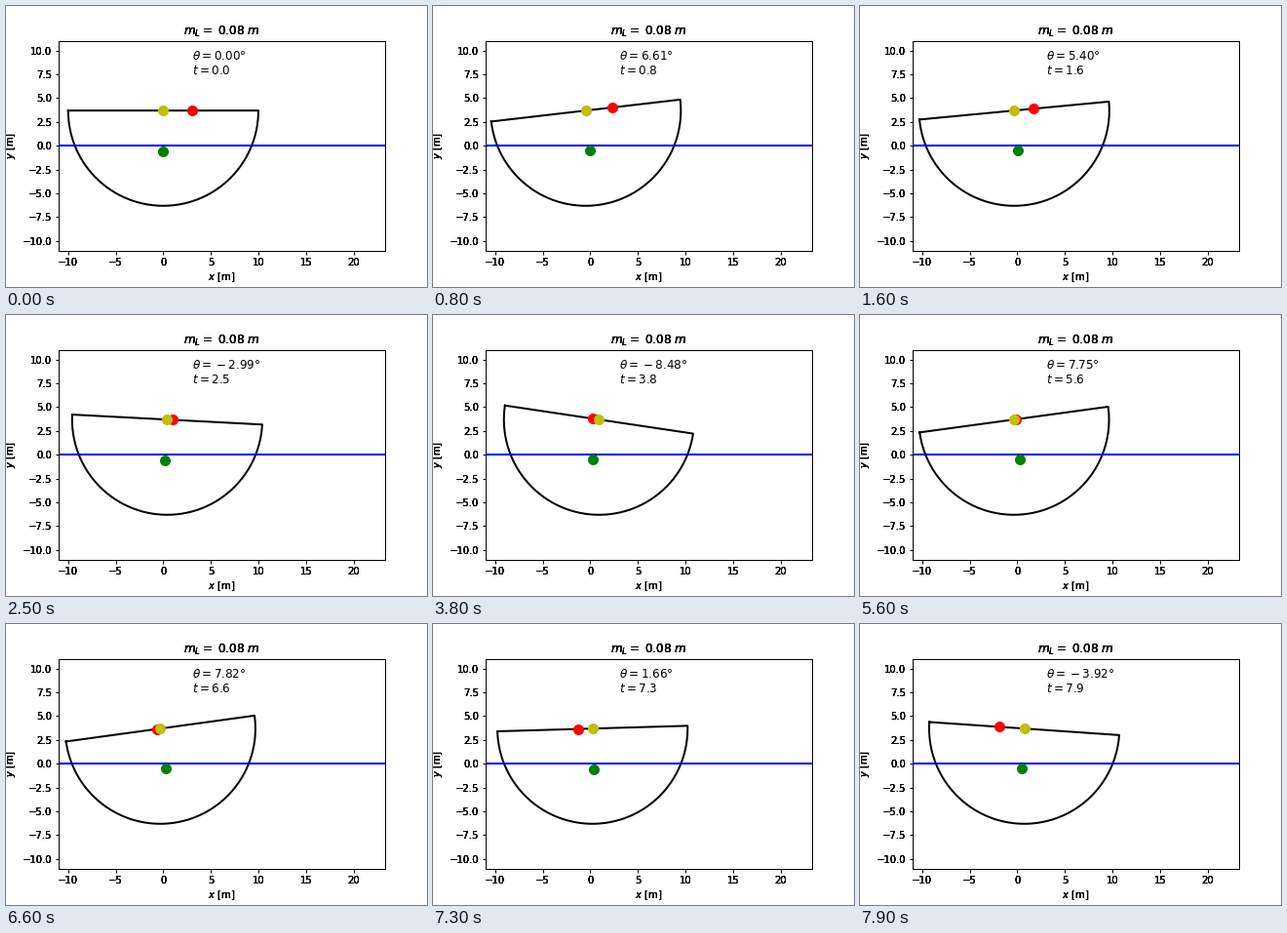
Animation of 432x288 px, one loop 8000 ms. Source, as a matplotlib script:

```python
import numpy as np
import matplotlib.pyplot as plt
from matplotlib.animation import FuncAnimation

plt.rcParams.update({"font.size": 10, "font.family": "DejaVu Sans"})

# Half-cylinder ship with a load sliding without friction on its deck
R, G = 10.0, 9.81
LOAD = 0.08                                     # load mass / ship mass
H = 4 * R / (3 * np.pi)                         # deck centre to mass centre
INERTIA = 0.5 * R**2 * (1 - 32 / (9 * np.pi**2))
Y_DECK = 3.70
FRAMES, STEP, SUB = 80, 0.1, 20


def rate(u):
    th, w, s, v = u
    torque = -(1 + LOAD) * G * H * np.sin(th) - LOAD * G * s * np.cos(th)
    return np.array([w, torque / INERTIA, v, -G * np.sin(th)])


def simulate():
    u, dt = np.array([0.0, 0.2, 3.0, 0.0]), STEP / SUB
    rows = []
    for _ in range(FRAMES):
        rows.append(u)
        for _ in range(SUB):
            k1 = rate(u)
            k2 = rate(u + dt / 2 * k1)
            k3 = rate(u + dt / 2 * k2)
            k4 = rate(u + dt * k3)
            u = u + dt / 6 * (k1 + 2 * k2 + 2 * k3 + k4)
    return np.array(rows)


def harden(text, times=5):
    """Paint a text several times so its soft edges turn solid."""
    draw = text.draw

    def repeat(renderer):
        for _ in range(times):
            draw(renderer)

    text.draw = repeat


states = simulate()

fig, ax = plt.subplots(figsize=(6, 4), dpi=72)
fig.subplots_adjust(left=0.125, right=0.9, bottom=0.125, top=0.88)
ax.set_aspect("equal")
ax.set_xlim(-11, 23.3)
ax.set_ylim(-11, 11)
ax.set_xticks(np.arange(-10, 21, 5))
ax.set_yticks(np.arange(-10, 10.1, 2.5))
ax.tick_params(width=1)
for spine in ax.spines.values():
    spine.set_linewidth(1)
ax.set_xlabel("$x$ [m]")
ax.set_ylabel("$y$ [m]")
ax.set_title("$m_L=$ 0.08 $m$", fontsize=12)
for label in [ax.title, ax.xaxis.label, ax.yaxis.label,
              *ax.get_xticklabels(), *ax.get_yticklabels()]:
    harden(label)

hull, = ax.plot([], [], "k", lw=2)
ax.axhline(0, color="b", lw=2)
mass_dot, load_dot, deck_dot = (
    ax.plot([], [], "o", color=c, ms=10)[0] for c in "gry")
angle_text = ax.text(3, 9, "", fontsize=12)
time_text = ax.text(3, 7.5, "", fontsize=12)


def update(i):
    th, _, s, _ = states[i]
    x_mass = LOAD * (states[0, 2] - s)          # momentum is conserved
    x = x_mass - H * np.sin(th)
    arc = th + np.linspace(np.pi, 2 * np.pi, 181)
    px, py = x + R * np.cos(arc), Y_DECK + R * np.sin(arc)
    hull.set_data(np.append(px, px[0]), np.append(py, py[0]))
    mass_dot.set_data([x_mass], [Y_DECK - H * np.cos(th)])
    load_dot.set_data([x + s * np.cos(th)], [Y_DECK + s * np.sin(th)])
    deck_dot.set_data([x], [Y_DECK])
    angle_text.set_text(rf"$\theta = {np.degrees(th):.2f}$°")
    time_text.set_text(f"$t = {i * STEP:.1f}$")
    return hull, mass_dot, load_dot, deck_dot, angle_text, time_text


anim = FuncAnimation(fig, update, frames=FRAMES, interval=100,
                     repeat=True, repeat_delay=0)
plt.show()
```
